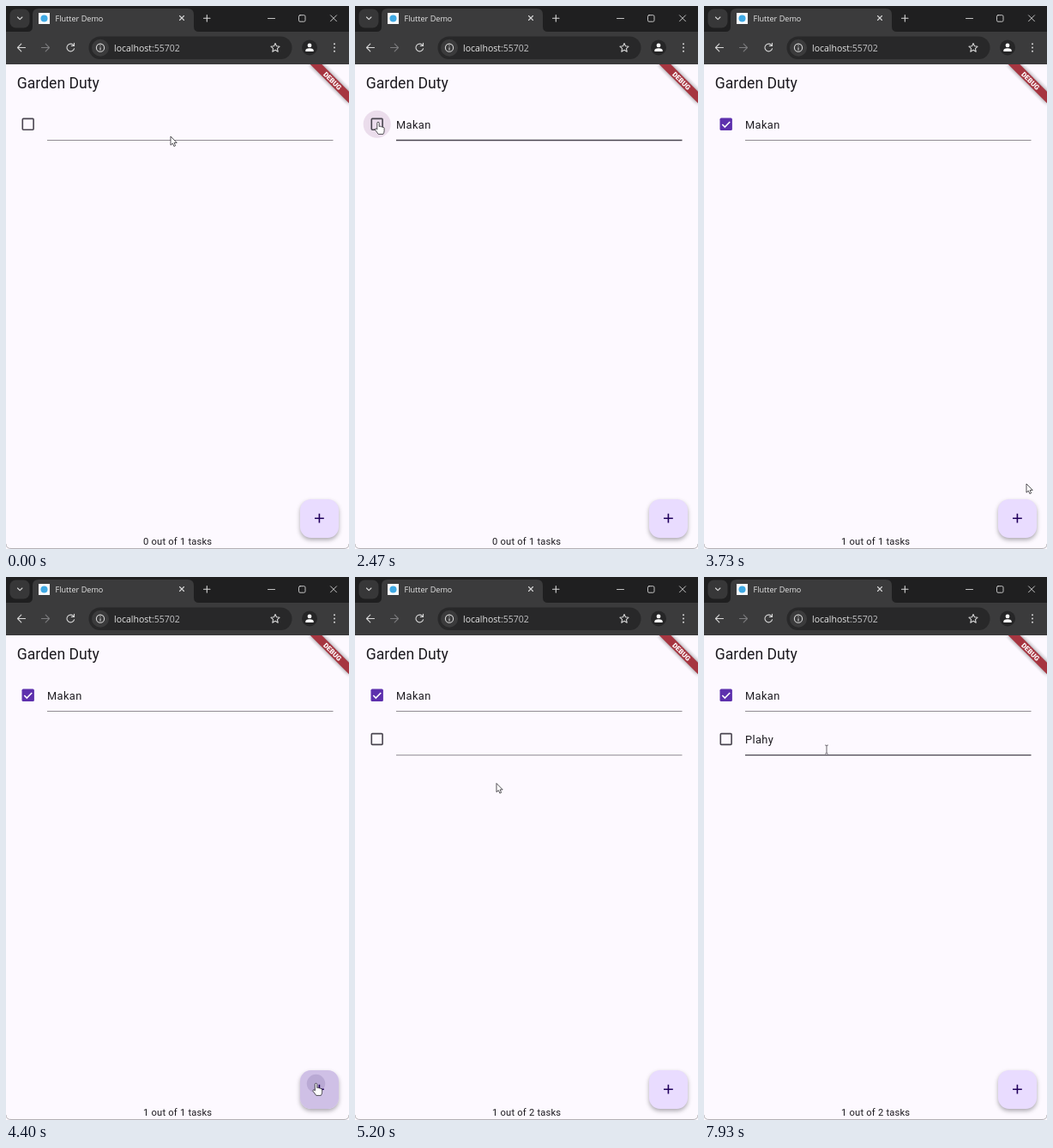
An HTML page for the animation above (8000 ms loop, 400 by 633 pixels).

```html
<!DOCTYPE html>
<html lang="en">
<head>
<meta charset="utf-8">
<title>Task list</title>
<style>
  html, body { margin: 0; width: 100%; height: 100%; overflow: hidden; background: #fdf9ff; }
  svg { display: block; width: 100vw; height: 100vh; }
  text { font-family: Roboto, sans-serif; fill: #1d1b20; white-space: pre; }
  .ui { font-family: "Open Sans", sans-serif; fill: #e6e6e6; }
  .icon { fill: none; stroke: #d6d6d6; stroke-width: 1.1; stroke-linecap: round; stroke-linejoin: round; }
  .task { font-size: 12.8px; letter-spacing: .4px; }
</style>
</head>
<body>
<svg viewBox="0 0 400 633">
  <defs>
    <filter id="soft" x="-40%" y="-40%" width="180%" height="180%"><feGaussianBlur stdDeviation="2.4"/></filter>
    <clipPath id="page"><rect y="68" width="400" height="565"/></clipPath>
    <clipPath id="fabClip"><rect x="343" y="575" width="45" height="45" rx="12.8"/></clipPath>
  </defs>

  <rect width="400" height="633" fill="#fdf9ff"/>

  <!-- browser window -->
  <rect width="400" height="31" fill="#1f1f20"/>
  <rect y="30" width="400" height="38" fill="#3b3b3c"/>
  <path d="M25 30q6 0 6-6V10q0-7 7-7h174q7 0 7 7v14q0 6 6 6z" fill="#3b3b3c"/>
  <rect x="4.500" y="3.500" width="23" height="22" rx="7" fill="#373738"/>
  <rect x="38" y="8" width="13" height="13" fill="#f8fafc"/>
  <circle cx="44.500" cy="14.500" r="4" fill="#3fa9e4"/>
  <text class="ui" x="57.500" y="18" font-size="9.1">Flutter Demo</text>
  <rect x="96.500" y="35.500" width="237" height="26.500" rx="13.200" fill="#282829"/>
  <circle cx="110" cy="48.700" r="10" fill="#3b3b3c"/>
  <text class="ui" x="126" y="52.600" font-size="10.5">localhost<tspan fill="#c4c4c6">:55702</tspan></text>
  <g class="icon">
    <path d="M13.500 13l2.700 2.700 2.700-2.700"/>
    <path d="M202.500 11.500l5 5m0-5l-5 5M230.500 14.300h7.500m-3.700-3.700v7.500"/>
    <path d="M305.500 14.500h8M378.500 10.800l7 7m0-7l-7 7" stroke-width=".9"/>
    <rect x="341.500" y="10.700" width="7.500" height="7.500" rx="1.500" stroke-width=".9"/>
    <path d="M22.500 48.500h-9m4.300-4.300l-4.300 4.300 4.300 4.300"/>
    <path d="M41.500 48.500h9m-4.300-4.300l4.300 4.300-4.300 4.300" stroke="#7c7c7e"/>
    <path d="M79 46a4.400 4.400 0 1 0 .6 3.700M79.500 43.300v3.200h-3.200"/>
    <circle cx="110" cy="48.700" r="4.600"/>
    <path d="M110 48.500v2.600M110 46.300v.1"/>
    <path d="M314 43.500l1.500 3.300 3.600.4-2.700 2.400.8 3.600-3.200-1.900-3.200 1.900.8-3.600-2.700-2.400 3.600-.4z"/>
  </g>
  <circle cx="354" cy="48.500" r="9" fill="#262627"/>
  <g fill="#fff"><circle cx="354" cy="45.900" r="2.400"/><path d="M349.300 53v-1.200q0-2.500 4.700-2.500t4.700 2.500V53z"/></g>
  <g fill="#d6d6d6"><circle cx="383" cy="44.300" r="1"/><circle cx="383" cy="48.500" r="1"/><circle cx="383" cy="52.700" r="1"/></g>

  <!-- page -->
  <text x="12.800" y="95.500" font-size="17.6">Garden Duty</text>
  <g clip-path="url(#page)">
    <g transform="translate(400 68) rotate(45)">
      <rect x="-32" y="22.400" width="64" height="9.600" fill="#000" opacity=".5" filter="url(#soft)"/>
      <rect x="-32" y="22.400" width="64" height="9.600" fill="#a63540"/>
      <text x="0" y="30.100" text-anchor="middle" font-size="8.1" font-weight="900" style="fill:#fff">DEBUG</text>
    </g>
  </g>
  <g id="rows"></g>
  <text id="count" x="200.200" y="628" text-anchor="middle" font-size="11.2" letter-spacing=".2"></text>

  <rect x="343" y="577.500" width="45" height="45" rx="12.800" fill="#6a6670" opacity=".55" filter="url(#soft)"/>
  <rect x="343" y="575" width="45" height="45" rx="12.800" fill="#e9dcff"/>
  <g clip-path="url(#fabClip)">
    <rect id="shade" x="343" y="575" width="45" height="45" fill="#cfc0e6"/>
    <circle id="ripple" cx="361.500" cy="590.500" fill="#b5a4d0"/>
  </g>
  <path d="M365.400 591.800v10.800M360 597.200h10.800" stroke="#21005d" stroke-width="1.600"/>
  <path d="M0 627q0 5.500 6 5.500h388q6 0 6-5.500" fill="none" stroke="#b3b0b4"/>

  <g id="cursor">
    <path d="M0 0v10.200l2.300-2.100 1.600 3.500 1.700-.8-1.500-3.400h3.100z" fill="#fff" stroke="#29272c" stroke-width=".8"/>
    <path d="M-1.800-5q1.800 0 1.800 1V4q0 1-1.800 1M1.800-5Q0-5 0-4M0 4q0 1 1.800 1" fill="none" stroke="#555358" stroke-width=".9"/>
    <path d="M-1.200 1q0-1.200 1.200-1.200T1.200 1v4l1.100-.3q1 0 1.100.7 1.900-.4 2 .6 1.700-.3 1.700 1v3q0 2-1.300 3.900H.2q-1.600-2.300-3.600-4.900-.6-1.300.5-1.600.8-.1 1.700 1z" fill="#fff" stroke="#29272c" stroke-width=".8"/>
  </g>
</svg>

<script>
const LOOP = 8000;
const $ = id => document.getElementById(id);
const set = (el, attrs) => { for (const k in attrs) el.setAttribute(k, attrs[k]); };
const ramp = (t, a, b) => Math.max(0, Math.min(1, (t - a) / (b - a)));
const pulse = (t, a, b, d) => ramp(t, a, a + d) - ramp(t, b, b + d);
const ease = p => p * p * (3 - 2 * p);

const tasks = [
  { y: 137.8, word: "Makan", keys: [950, 1130, 1270, 1400, 1670], show: 0, focus: 480, blur: 2600, check: 2600 },
  { y: 189, word: "Plahy", keys: [6530, 6730, 6870, 7070, 7270], show: 4600, focus: 6050, blur: 9000, check: 9000 }
];

// Pointer stops: time, x, y
const stops = [
  [0, 192, 152], [350, 183, 143], [2000, 183, 143], [2350, 27, 135.500], [2900, 27, 135.500],
  [3670, 376, 557], [3950, 376, 557], [4250, 361.500, 590.500], [4650, 361.500, 590.500],
  [5130, 165, 240.500], [5480, 165, 240.500], [5950, 143, 201], [LOOP, 143, 201]
];

$("rows").innerHTML = tasks.map(({ y }) => `
  <g transform="translate(0 ${y})">
    <circle cx="25.700" r="16" fill="#ebddec"/>
    <rect x="19.300" y="-6.400" width="12.800" height="12.800" rx="1" fill="none" stroke="#49454f" stroke-width="1.600"/>
    <rect x="18.500" y="-7.200" width="14.400" height="14.400" rx="1.600" fill="#5d30ad"/>
    <path d="M21.300 .2l3 3 5.900-6" pathLength="1" stroke-dasharray="1 2" fill="none" stroke="#fff" stroke-width="1.600"/>
    <text class="task" x="48" y="5.300"></text>
    <rect y="-10" width="1.600" height="19" fill="#6750a4"/>
    <path d="M48 18.700H381.500"/>
  </g>`).join("");
tasks.forEach((task, i) => {
  task.el = $("rows").children[i];
  [task.halo, task.box, task.fill, task.tick, task.label, task.caret, task.line] = task.el.children;
});

function pointer(t) {
  const i = stops.findIndex(s => s[0] > t);
  const [a, x0, y0] = stops[i - 1], [b, x1, y1] = stops[i];
  const p = ease(ramp(t, a, b));
  return [x0 + (x1 - x0) * p, y0 + (y1 - y0) * p];
}

function shape(x, y, t) {
  if (x > 343 && x < 388 && y > 575 && y < 620) return 2;
  for (const task of tasks) {
    if (t < task.show) continue;
    if (Math.hypot(x - 25.7, y - task.y) < 16) return 2;
    if (x > 48 && x < 381 && Math.abs(y - task.y) < 13) return 1;
  }
  return 0;
}

function drawTask(task, t) {
  const typed = task.keys.filter(k => k <= t);
  const text = task.word.slice(0, typed.length);
  if (task.label.textContent !== text) task.label.textContent = text;
  const active = t >= task.focus && t < task.blur;
  const since = t - (typed.length ? typed[typed.length - 1] : task.focus);
  const lit = active && since % 1000 < 500;
  set(task.el, { visibility: t >= task.show ? "visible" : "hidden" });
  set(task.caret, { x: 48 + task.label.getComputedTextLength() - .2, opacity: lit ? 1 : 0 });
  set(task.line, active
    ? { stroke: "#49454f", "stroke-width": 1.3 }
    : { stroke: "#858087", "stroke-width": .9 });
  set(task.halo, { opacity: task.check < LOOP ? pulse(t, 2200, 3000, 120) : 0 });
  set(task.fill, { opacity: ramp(t, task.check, task.check + 90) });
  set(task.box, { opacity: 1 - ramp(t, task.check, task.check + 90) });
  set(task.tick, {
    "stroke-dashoffset": 1 - ramp(t, task.check + 70, task.check + 200),
    opacity: t > task.check + 70 ? 1 : 0
  });
}

function render(t) {
  tasks.forEach(task => drawTask(task, t));
  const done = tasks.filter(k => t >= k.check).length;
  const total = tasks.filter(k => t >= k.show).length;
  $("count").textContent = `${done} out of ${total} tasks`;

  set($("shade"), { opacity: .3 * pulse(t, 4130, 4700, 100) + .7 * pulse(t, 4280, 4560, 100) });
  set($("ripple"), { r: 4 + 40 * ramp(t, 4320, 4800), opacity: .8 * pulse(t, 4320, 4560, 50) });

  const [x, y] = pointer(t), kind = shape(x, y, t);
  set($("cursor"), { transform: `translate(${x} ${y})` });
  [...$("cursor").children].forEach((c, i) => set(c, { display: i === kind ? "inline" : "none" }));
}

const start = performance.now();
function tick() {
  render((performance.now() - start) % LOOP);
  requestAnimationFrame(tick);
}
tick();
</script>
</body>
</html>
```
